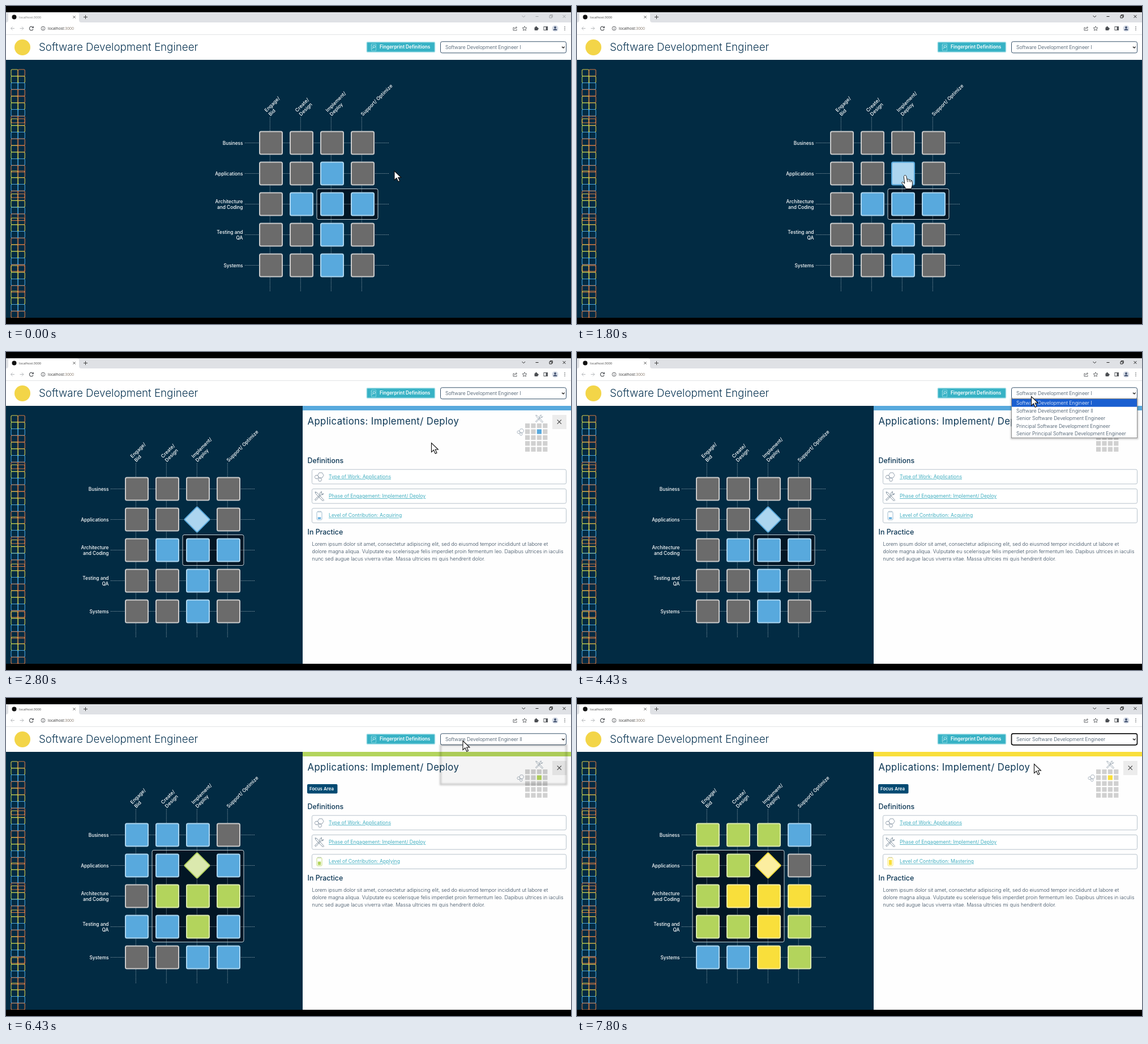
These frames come from a looping animation (998x561 px, 8 s). An HTML page:

```html
<!DOCTYPE html>
<html lang="en">
<head>
<meta charset="utf-8">
<title>Software Development Engineer</title>
<style>
html, body { margin: 0; height: 100%; overflow: hidden; background: #000; }
svg { display: block; width: 100vw; height: 100vh; }
text { font-family: Inter, sans-serif; white-space: pre; }
.chrome { font-family: "Open Sans", sans-serif; }
.shadow { filter: blur(1.5px); }
</style>
</head>
<body>
<svg id="stage" viewBox="0 0 998 561">
  <g id="page"></g>
  <g id="list"></g>
  <path id="arrow" d="M.5 .5V16.6L4.4 13L7.3 19.2L10 18L7.2 12H12.4Z" fill="#fff" stroke="#111" stroke-width="1.1"/>
  <path id="hand" d="M1 1.5C2.5 -.2 4.3.8 4.7 2.6L6 8C7.6 7 9 7.6 9.6 8.6C11 7.8 12.3 8.6 12.8 9.8C14.5 9.6 15.4 10.7 15.5 12.4L15.3 18L13.4 24.5H3.5L2.5 21.5L-3.3 14.5C-4 12.8-1.8 11.8 0 13.6L1.8 15.2L.3 3.6Q.2 2.3 1 1.5ZM6 8L6.8 12.5M9.6 8.6L10 12.5M12.8 9.8L12.9 13" fill="#fff" stroke="#111" stroke-width="1"/>
</svg>
<script>
const LOOP = 8000, PITCH = 54, NAVY = '#022b43', INK = '#0b3654', TEAL = '#37b2c5';
const $ = id => document.getElementById(id);

const COLORS = {
  g: ['#6b6b6b', '#cacaca'],
  b: ['#58a9dd', '#acd5ef'],
  G: ['#b3d45c', '#dbe9ae'],
  Y: ['#f9df3b', '#fceea0']
};
const LEVELS = [
  { role: 'Software Development Engineer I', word: 'Acquiring', key: 'b', fill: 3,
    cells: ['gggg', 'ggbg', 'gbbb', 'ggbg', 'ggbg'], focus: [2, 2, 3, 2] },
  { role: 'Software Development Engineer II', word: 'Applying', key: 'G', fill: 6,
    cells: ['bbbg', 'bbGb', 'gGGG', 'bbGb', 'ggbb'], focus: [1, 1, 3, 3] },
  { role: 'Senior Software Development Engineer', word: 'Mastering', key: 'Y', fill: 9,
    cells: ['GGGb', 'GGYg', 'GYYY', 'GGYG', 'bbYG'], focus: [0, 1, 2, 3] }
];
const ROLES = [...LEVELS.map(l => l.role), 'Principal Software Development Engineer',
  'Senior Principal Software Development Engineer'];
const ROWS = [['Business'], ['Applications'], ['Architecture', 'and Coding'], ['Testing and', 'QA'], ['Systems']];
const COLS = [['Engage/', 'Bid'], ['Create/', 'Design'], ['Implement/', 'Deploy'], ['Support/ Optimize']];
const LOREM = [
  'Lorem ipsum dolor sit amet, consectetur adipiscing elit, sed do eiusmod tempor incididunt ut labore et',
  'dolore magna aliqua. Vulputate eu scelerisque felis imperdiet proin fermentum leo. Dapibus ultrices in iaculis',
  'nunc sed augue lacus viverra vitae. Massa ultricies mi quis hendrerit dolor.'
];
// time, x, y of the pointer tip
const POINTER = [[0, 685.5, 290.5], [860, 685.5, 290.5], [1560, 577, 298], [2460, 577, 298], [2800, 751, 160],
  [3260, 798, 97.5], [3630, 802, 78], [4430, 802, 78], [4900, 803, 102], [5730, 803, 102],
  [6200, 806.5, 75], [6760, 806.5, 75], [7330, 807, 116], [LOOP, 807, 116]];
const MENUS = [[3860, 5330], [6430, 7760]];

const rect = (x, y, w, h, fill, more = '') =>
  `<rect x="${x}" y="${y}" width="${w}" height="${h}" fill="${fill}" ${more}/>`;
const line = (d, color, width = 1, more = '') =>
  `<path d="${d}" fill="none" stroke="${color}" stroke-width="${width}" ${more}/>`;
const shape = (d, fill) => `<path d="${d}" fill="${fill}"/>`;
const circle = (x, y, r, fill, more = '') => `<circle cx="${x}" cy="${y}" r="${r}" fill="${fill}" ${more}/>`;
const text = (s, x, y, size, fill, weight = 400, more = '') =>
  `<text x="${x}" y="${y}" font-size="${size}" fill="${fill}" font-weight="${weight}" ${more}>${s}</text>`;
const at = (x, y, s, scale = 1) => `<g transform="translate(${x} ${y}) scale(${scale})">${s}</g>`;
const cross = (x, y, r, color, width) =>
  line(`M${x - r} ${y - r}l${2 * r} ${2 * r}m0 ${-2 * r}l${-2 * r} ${2 * r}`, color, width);
const stroke = (color, width = 1) => `stroke="${color}" stroke-width="${width}"`;

function browser(active) {
  const dark = active ? '#222' : '#a0a3a6', icon = '#55585c', pale = '#b8bbbe';
  return rect(0, 0, 998, 561, '#000') + rect(0, 11, 998, 18, '#dfe1e5') +
    shape('M0 29Q4 29 4 25V15Q4 11.5 8 11.5H125Q129 11.5 129 15V25Q129 29 133 29Z', '#fff') +
    circle(14.5, 19.5, 4, '#111') +
    text('localhost:3000', 23, 21.7, 5.8, active ? '#444' : '#777', 400, 'class="chrome"') +
    cross(120.5, 19.5, 2, '#444', 1) + line('M137 19.5h7m-3.5 -3.5v7', '#444') +
    line('M911.5 17l2.8 2.8l2.8 -2.8M935.5 18.5h5M960 17h4v4h-4zM961.3 17v-1.4h4v4H964', dark) +
    cross(986, 18.5, 2.4, dark, 1) +
    rect(0, 29, 998, 22, '#fff') + rect(0, 50, 998, 1, '#e2e3e5') +
    line('M15 39.5H8.5m3 -3l-3 3l3 3M24.5 39.5h6.5m-3 -3l3 3l-3 3', pale) +
    line('M47.7 37.8A3.4 3.4 0 1 0 48 40.8M48.3 35.8v2.7h-2.7', icon, 1.2) +
    circle(65.5, 39.5, 3.4, 'none', stroke(icon, .9)) + line('M65.5 39v2.5M65.5 37.2v1', icon, .9) +
    text('localhost<tspan fill="#85776a">:3000</tspan>', 74, 42, 6.8, '#333', 400, 'class="chrome"') +
    line('M898 38h-2v5h6v-2M898 41q0 -3 4 -3m-1.5 -2l2 2l-2 2', icon, .9) +
    line('M916 35.7l1.2 2.5l2.7.3l-2 1.9l.5 2.7l-2.4 -1.3l-2.4 1.3l.5 -2.7l-2 -1.9l2.7 -.3z', icon, .9) +
    rect(933.5, 37.5, 6, 5.5, '#4b4e52', 'rx="1"') + circle(936.5, 37.2, 1.5, '#4b4e52') + circle(939.5, 40, 1.3, '#4b4e52') +
    rect(950, 36.5, 6.5, 6, 'none', stroke(icon)) + rect(953.5, 36.5, 3, 6, icon) +
    circle(970, 39.5, 5.5, '#d5dbe6') + circle(970, 37.8, 1.9, '#3e4e6c') +
    shape('M966.5 42.8q0 -2.6 3.5 -2.6t3.5 2.6z', '#3e4e6c') +
    [36.8, 39.5, 42.2].map(y => circle(987, y, .8, icon)).join('');
}

function header(role, focused) {
  return rect(0, 51, 998, 44, '#fff') + circle(29, 73, 14, '#f3d548') +
    text('Software Development Engineer', 58, 79.3, 18.75, INK, 300) +
    rect(637.2, 63.7, 120.3, 17.6, TEAL, 'rx="1.5" ' + stroke('#a5dfe7', 1.5)) +
    line('M645.5 67h8v12h-8zM644 69.5h3m-3 3h3m-3 3h3', '#8fd8e3', .8) +
    circle(650.3, 71.5, 2, 'none', stroke('#d4f2f6', .9)) + line('M649 73l-2 2.5', '#d4f2f6', .9) +
    text('Fingerprint Definitions', 660, 75.3, 8.25, '#fff', 600) +
    rect(767.5, 62.8, 222, 20, '#fff', 'rx="3" ' + (focused ? stroke('#101010', 1.7) : stroke('#35506a', 1))) +
    text(role, 776, 76.2, 8.6, '#34495c', 300) + line('M982 71.7l2.3 2.3l2.3 -2.3', '#222', 1.3);
}

// stacked bands of four or eight linked squares, each overlapping the one above
function strip() {
  const yellow = '#dfd04c', green = '#b9cf55', blue = '#4aa3dc', orange = '#d97a45';
  const sides = [[yellow, green, blue, orange], [orange, yellow, blue, orange]];
  const bands = [112, 199, 291, 331.5, 374, 458, 503, 550];
  let out = '';
  bands.slice(0, -1).forEach((top, b) => {
    const count = bands[b + 1] - top > 60 ? 8 : 4;
    for (let i = 0; i < count; i++)
      sides.forEach((tones, s) =>
        out += rect(9 + s * 12.3, top + i * 11.75, 12, 11.7, 'none', 'rx="2" ' + stroke(tones[i % 4], 1.1)));
  });
  return out;
}

function matrix(level, open, hover) {
  const [c0, r0, c1, r1] = level.focus, dots = 'stroke-dasharray="1 1.3" opacity=".75"';
  let out = rect(441 + c0 * PITCH, 214.5 + r0 * PITCH, (c1 - c0 + 1) * PITCH, (r1 - r0 + 1) * PITCH,
    '#021625', 'rx="3" ' + stroke('#c8d0d6', 1));
  ROWS.forEach((words, r) => {
    const y = 241.5 + r * PITCH;
    out += line(`M422 ${y}H676`, '#cfd6db', 1, dots);
    words.forEach((w, i) => out += text(w, 418.5, y + 3 + (i - (words.length - 1) / 2) * 10, 8.3, '#fff', 500, 'text-anchor="end"'));
  });
  COLS.forEach((words, c) => {
    const x = 466.3 + c * PITCH;
    out += line(`M${x} 196V503`, '#cfd6db', 1, dots);
    words.forEach((w, i) => {
      const shift = words.length > 1 ? i * 7 - 6 : 2;
      const y = words.length > 1 ? 187.5 + i * 7 : 194.5;
      out += `<g transform="translate(${x + shift} ${y}) rotate(-45)">${text(w, 0, 0, 8.6, '#fff', 500)}</g>`;
    });
  });
  level.cells.forEach((row, r) => [...row].forEach((key, c) => {
    const x = 468 + c * PITCH, y = 241.5 + r * PITCH, [main, light] = COLORS[key];
    const chosen = r === 1 && c === 2;
    if (chosen && open)
      out += rect(x - 17.6, y - 16.1, 32.2, 32.2, light, `rx="2" ${stroke(main, 1.8)} transform="rotate(45 ${x - 1.5} ${y})"`);
    else if (chosen && hover) out += rect(x - 20, y - 20, 40, 40, light, 'rx="2.5" ' + stroke(main, 2));
    else out += rect(x - 20, y - 20, 40, 40, main, 'rx="2.5" ' + stroke(light, 2));
  }));
  return at(open ? -237 : 0, 0, out);
}

const hexagon = (x, y, r) => 'M' + [0, 1, 2, 3, 4, 5].map(i =>
  `${x + r * Math.cos(i * Math.PI / 3)} ${y + r * Math.sin(i * Math.PI / 3)}`).join('L') + 'Z';
const hexes = color => line(hexagon(2.3, -2.5, 5.2) + hexagon(-4.8, .5, 3.5) + hexagon(1, 5.2, 3.2), color, .9);
const tools = color => line('M-7.5 -7.5l3 1l9 9.5l3.5 4l-1.5 1.5l-4 -3.5l-9 -9.5zM7.5 -4.5q-1 3 -4.5 2l-8.5 9.5q-2 1 -2.5 -1l9 -8.5q-1 -4 3 -5.5l-.5 3l2 1.5z', color, .9);
const battery = (key, fill) => line('M-3 -6.5v-1H3v1', '#a5b2be', .8) +
  rect(-4.5, -6.5, 9, 14, '#fff', 'rx="1.5" ' + stroke(key === 'b' ? '#86abc4' : COLORS[key][0], .8)) +
  rect(-2.7, 6 - fill, 5.4, fill, COLORS[key][0]);

function panel(level, gauge) {
  const tint = COLORS[level.key][0], grey = '#8796a4';
  let out = rect(524, 95, 474, 455, '#fefefe') + rect(524, 95, 474, 8, tint) +
    text('Applications: Implement/ Deploy', 532.5, 127.5, 16.7, INK, 400, 'letter-spacing=".4"');
  for (let i = 0; i < 20; i++) {
    const c = i % 4, r = i >> 2;
    out += rect(917 + c * 10.4, 126 + r * 10.4, 8.2, 8.2, c === 2 && r === 1 ? tint : '#d0d0d0');
  }
  out += at(942, 117.5, tools(grey), .82) + at(909, 141, hexes(grey), .75) +
    rect(965, 111, 25, 25, '#ececec') + cross(977.3, 123.2, 3.6, '#444', 1.1);
  if (level.key !== 'b')
    out += rect(532, 152, 53.5, 16.5, '#034a72', 'rx="2"') + text('Focus Area', 536, 162.5, 7.9, '#fff', 600);
  out += text('Definitions', 532.5, 195.7, 12.4, INK, 500) + text('In Practice', 532.5, 321.5, 12.4, INK, 500);
  const icons = [hexes(grey), tools('#6d7f8f'), battery(gauge.key, gauge.fill)];
  ['Type of Work: Applications', 'Phase of Engagement: Implement/ Deploy', 'Level of Contribution: ' + level.word]
    .forEach((label, i) => {
      const y = 220 + i * 34.3;
      out += rect(540.5, y - 12.8, 449, 25.6, '#fff', 'rx="2.5" ' + stroke('#b7c2cb', 1)) + at(553.5, y, icons[i]) +
        text(label, 570, y + 2.8, 8.64, '#43afc1', 400, 'text-decoration="underline"');
    });
  LOREM.forEach((s, i) => out += text(s, 540.5, 342.2 + i * 13, 8.83, '#33475a', 300));
  return out;
}

function dropdown(opacity, picked) {
  const shadow = rect(767.5, 83, 222.5, 69.5, '#0000000a', 'class="shadow" ' + stroke('#0003', 3));
  let items = rect(767.5, 82.5, 222, 69, '#fff', stroke('#777', .8));
  ROLES.forEach((role, i) => {
    const y = 90 + i * 13.5, on = i === picked;
    if (on) items += rect(768, y - 7, 221, 13.7, '#1a5fd0');
    items += text(role, 776, y + 3, 8.6, on ? '#fff' : '#34495c', 300);
  });
  return shadow + `<g opacity="${opacity}">${items}</g>`;
}

function pointerAt(t) {
  const i = Math.max(1, POINTER.findIndex(p => p[0] > t));
  const [t0, x0, y0] = POINTER[i - 1], [t1, x1, y1] = POINTER[i];
  const k = (t - t0) / (t1 - t0), e = k * k * (3 - 2 * k);
  return [x0 + (x1 - x0) * e, y0 + (y1 - y0) * e];
}

// redraws a group only when its description changes
const drawn = {};
function update(id, key, make) {
  if (drawn[id] === key) return;
  drawn[id] = key;
  $(id).innerHTML = make();
}

function draw(t) {
  const [x, y] = pointerAt(t);
  const open = t >= 1960, active = t >= 1800;
  const index = t < 5330 ? 0 : t < 7760 ? 1 : 2;
  const gauge = LEVELS[t < 5360 ? 0 : t < 7800 ? 1 : 2];
  const hover = !open && x < 597;
  const menu = MENUS.find(([from, to]) => t >= from && t < to);
  const focused = index > 0 && !menu;
  const level = LEVELS[index];

  update('page', [open, active, index, gauge.word, hover, focused].join(), () =>
    browser(active) + header(level.role, focused) + rect(0, 95, 998, 455, NAVY) +
    strip() + matrix(level, open, hover) + (open ? panel(level, gauge) : '') + rect(0, 550, 998, 11, '#000'));

  const age = menu ? t - menu[0] : 0;
  const opacity = age < 30 ? 0 : age < 70 ? .5 : 1;
  const picked = y >= 83 ? Math.floor((y - 83) / 13.5) : index;
  update('list', menu ? opacity + '/' + picked : '', () => menu ? dropdown(opacity, picked) : '');

  const hand = hover || (open && t < 2460);
  $('hand').style.display = hand ? '' : 'none';
  $('arrow').style.display = hand ? 'none' : '';
  $(hand ? 'hand' : 'arrow').setAttribute('transform', `translate(${x} ${y})`);
}

const start = performance.now();
function frame() {
  draw((performance.now() - start) % LOOP);
  requestAnimationFrame(frame);
}
draw(0);
requestAnimationFrame(frame);
</script>
</body>
</html>
```
